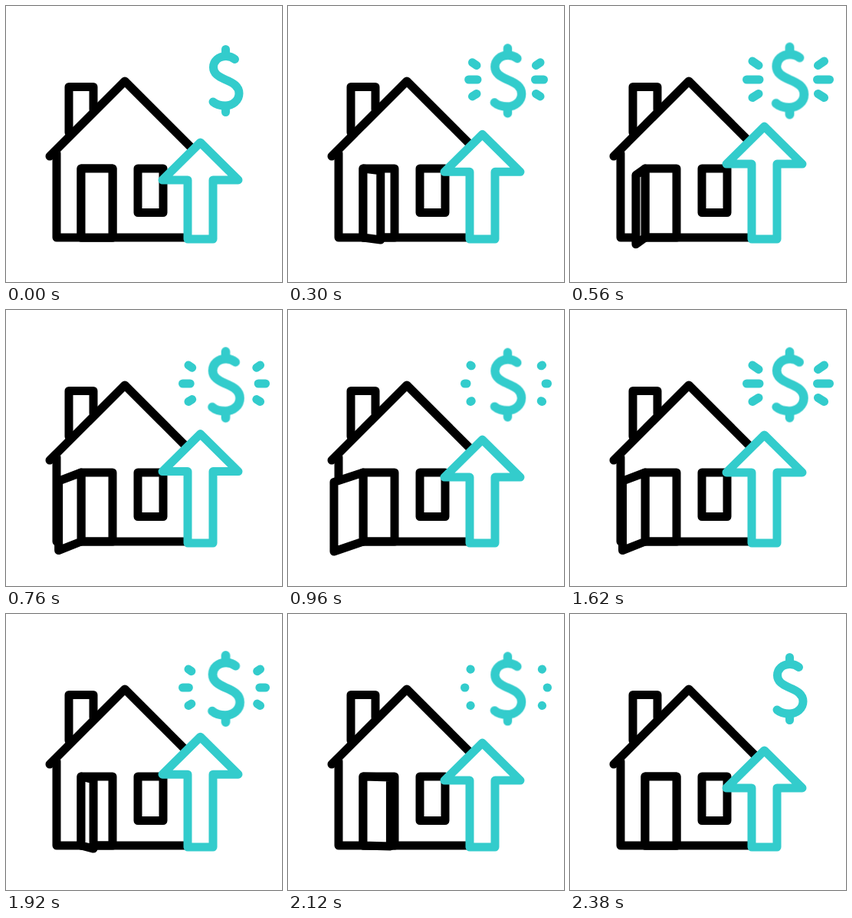
Animation of 360 by 360 pixels, one loop 2.4 s. Source, as an HTML page without scripts:

```html
<!DOCTYPE html>
<html lang="en">
<head>
<meta charset="utf-8">
<title>House value rising</title>
<style>
  html, body { margin: 0; width: 100%; height: 100%; overflow: hidden; background: #fff; }
  svg { display: block; width: 100vw; height: 100vh; }
  path, rect { fill: none; stroke: #000; stroke-width: 11; stroke-linecap: round; stroke-linejoin: round; }
  .teal path { stroke: #3cc; }
  .leaf, .teal .arrow { fill: #fff; }
  .leaf, .arrow, .dollar, .rays path { animation: 2.4s linear infinite; }

  .leaf { animation-name: swing; }
  @keyframes swing {
    0% { d: path("M98 212L139 212L139 302L98 302Z"); animation-timing-function: cubic-bezier(.35, 0, .35, 1); }
    50% { d: path("M98 212L57 225L57 315.5L98 302Z"); animation-timing-function: cubic-bezier(.7, 0, .38, 1); }
    100% { d: path("M98 212L139 212L139 302L98 302Z"); }
  }

  .arrow { animation-name: rise; }
  @keyframes rise {
    0%, 1.25%, 50%, 52.5%, 99%, 100% { d: path("M253.5 178L303 227L270 227L270 304L237 304L237 227L204 227Z"); }
    25%, 75% { d: path("M253.5 155.5L303 204.5L270 204.5L270 304L237 304L237 204.5L204 204.5Z"); }
  }

  .dollar { animation-name: pulse; transform-origin: 286.5px 97.5px; }
  @keyframes pulse {
    0%, 1.25%, 50%, 52.5%, 99%, 100% { transform: scale(1); }
    25%, 75% { transform: scale(1.08); }
  }

  /* Each ray grows outwards, then its inner end follows. */
  .rays path { stroke-dasharray: 1 3; animation-name: shine; }
  @keyframes shine {
    0%, 2.5% { stroke-dashoffset: 1.02; opacity: 0; }
    2.6% { opacity: 1; }
    17%, 23.75% { stroke-dashoffset: 0; }
    42.9% { opacity: 1; }
    43% { stroke-dashoffset: -1; opacity: 0; }
    43.01%, 53% { stroke-dashoffset: 1.02; opacity: 0; }
    53.1% { opacity: 1; }
    66.5%, 70.4% { stroke-dashoffset: 0; }
    88.7% { opacity: 1; }
    88.8%, 100% { stroke-dashoffset: -1; opacity: 0; }
  }
</style>
</head>
<body>
<svg viewBox="0 0 360 360">
  <path d="M82 165V105.500H114V135"/>
  <path d="M66 192V302H237"/>
  <path d="M57 196L155 98L245 188"/>
  <rect x="172" y="212" width="33" height="57.500"/>
  <rect x="98" y="212" width="41" height="90"/>
  <path class="leaf" d="M98 212L139 212L139 302L98 302Z"/>
  <g class="teal">
    <path class="arrow" d="M253.500 178L303 227L270 227L270 304L237 304L237 227L204 227Z"/>
    <g class="dollar">
      <path d="M298.500 69.500C295 66.500 291 65.500 287 65.500C277 65.500 270.500 72 270.500 80C270.500 88 277 92 286 96C297 100.500 304 105 304 114C304 123 296 130 286 130C280 130 274 128.500 270 125"/>
      <path d="M286.500 56.500V65M286.500 131V138.500"/>
    </g>
    <g class="rays">
      <path pathLength="1" d="M246 77.500L238 72"/>
      <path pathLength="1" d="M247 96H230.500"/>
      <path pathLength="1" d="M246 114.500L238 119.500"/>
      <path pathLength="1" d="M323.500 77.500L331.500 72"/>
      <path pathLength="1" d="M322.500 96H338.500"/>
      <path pathLength="1" d="M323.500 114.500L331.500 119.500"/>
    </g>
  </g>
</svg>
</body>
</html>
```
